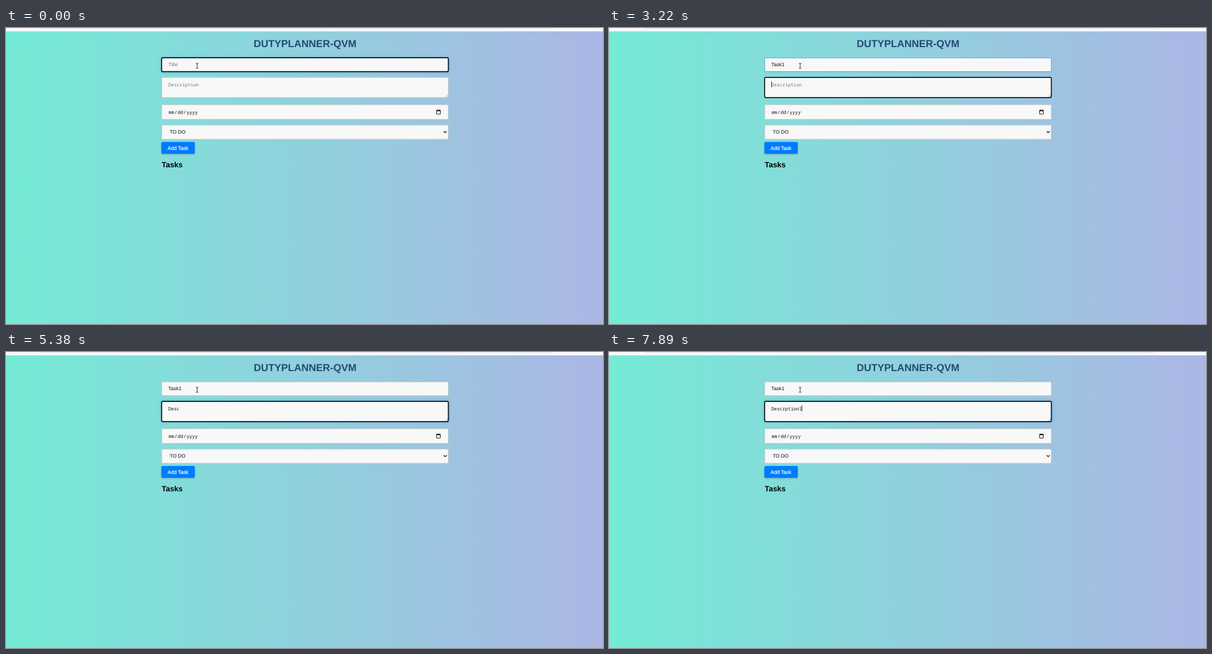
Animation, 1063 px wide and 527 px high, one loop 8 s. Source, as an HTML page:

```html
<!DOCTYPE html>
<html lang="en">
<head>
<meta charset="utf-8">
<title>Task form</title>
<style>
  html, body { margin: 0; width: 100%; height: 100%; overflow: hidden; }
  svg {
    display: block; width: 1063px; height: 527px;
    background: linear-gradient(90deg, #74ebd5, #acb6e5);
    font: 9px "Liberation Sans", Arial, sans-serif;
    text-rendering: geometricPrecision;
  }
  text { fill: #111; white-space: pre; }
  .mono { font: 8.25px "Noto Sans Mono", monospace; }
  .bold { font-weight: 700; }
  .hint { fill: #757575; }
  .box { fill: #f8f8f8; stroke: #c9cbcb; stroke-width: 1.1; }
  .ring { fill: none; stroke: #101010; stroke-width: 1.7; visibility: hidden; }
  .focus .ring { visibility: visible; }
  .focus .box, .fading .box { stroke: #5ba6ec; }
  .glow .box { filter: drop-shadow(0 .8px 2px rgba(0, 90, 190, .55)); }
  .button { fill: #007bff; filter: drop-shadow(0 1.2px 1.6px rgba(0, 40, 90, .3)); }
  .line { fill: none; stroke: #111; }
</style>
</head>
<body>
<svg viewBox="0 0 1063 527">
  <rect width="1063" height="6" fill="#f8f9fa"/>
  <rect x="64" width="907" height="1.4" fill="#e3e6f6"/>

  <text class="bold" x="532.5" y="34.3" font-size="18" text-anchor="middle" style="fill:#264a73">DUTYPLANNER-QVM</text>

  <g id="title">
    <rect class="box" x="277.3" y="53.2" width="510.2" height="24.4" rx="1.8"/>
    <rect class="ring" x="277.2" y="52.9" width="510.4" height="24.8" rx="2"/>
    <text class="hint" x="289" y="68.2">Title</text>
    <text class="value" x="289" y="68.2"></text>
    <rect class="caret" y="61" width="1" height="9.5" fill="#222"/>
  </g>

  <g id="desc">
    <rect class="box" x="277.3" y="88" width="510.2" height="35.8" rx="1.8"/>
    <path class="line" d="M782 123 L787 118 M785 123 L787 121" stroke-width=".6" style="stroke:#777"/>
    <rect class="ring" x="277.2" y="87.8" width="510.4" height="36" rx="2"/>
    <text class="mono hint" x="289" y="103.8">Description</text>
    <text class="mono value" x="289" y="103.8"></text>
    <rect class="caret" y="95" width="1" height="10.5" fill="#222"/>
  </g>

  <rect class="box" x="277.3" y="136.6" width="510.2" height="26" rx="1.8"/>
  <text class="mono" y="152.7"><tspan x="289.5">mm</tspan><tspan dx=".6">/</tspan><tspan dx=".6">dd</tspan><tspan dx=".6">/</tspan><tspan dx=".6">yyyy</tspan></text>
  <path class="line" d="M766.7 146.7 H773.4 V153.2 H766.7 Z M768.3 145 V147 M771.8 145 V147"/>
  <path class="line" d="M766.4 147.3 H773.7" stroke-width="1.6"/>

  <rect class="box" x="277.3" y="172.9" width="510.2" height="25.2" rx="1.8"/>
  <text x="291.4" y="188.2">TO DO</text>
  <path class="line" d="M779.3 183.7 L782 186.4 L784.7 183.7" stroke-width="1.3"/>

  <rect class="button" x="276.7" y="203" width="59.4" height="21" rx="2.3"/>
  <text x="306.3" y="216.6" text-anchor="middle" style="fill:#fff;stroke:#fff;stroke-width:.25px">Add Task</text>

  <text class="bold" x="277.3" y="248.2" font-size="13.5" style="fill:#000">Tasks</text>

  <path class="line" d="M338 62.7 Q340.3 62.7 340.3 64 V70.6 Q340.3 71.9 338 71.9 M342.6 62.7 Q340.3 62.7 340.3 64 M340.3 70.6 Q340.3 71.9 342.6 71.9" stroke-width=".9"/>
</svg>
<script>
  const LOOP = 8000, LEFT = 289, SWITCH = 3220, SETTLED = 3350;

  // [start in ms, typed text, caret visible]
  const titleSteps = [
    [0, "", false], [130, "", true], [570, "", false], [1130, "", true],
    [1550, "T", true], [2090, "Ta", true], [2230, "Tas", true],
    [2360, "Task", true], [2650, "Task1", true], [SWITCH, "Task1", false]
  ];
  const descSteps = [
    [0, "", false], [SWITCH, "", true], [3770, "", false],
    [3910, "D", true], [4200, "De", true], [4350, "Des", true],
    [4730, "Desc", true], [5380, "Desc", false], [5650, "Descr", true],
    [5800, "Descro", true], [6230, "Descr", true], [6370, "Descr", false],
    [6930, "Descrp", true], [7070, "Descrpt", true], [7200, "Descrpti", true],
    [7340, "Descrptio", true], [7500, "Descrption", true], [7890, "Descrption1", true]
  ];

  function makeField(id, steps) {
    const group = document.getElementById(id);
    const [hint, value, caret] = [".hint", ".value", ".caret"].map(s => group.querySelector(s));
    let shown;
    return (time, state) => {
      group.setAttribute("class", state);
      const step = steps.findLast(s => s[0] <= time);
      if (step === shown) return;
      shown = step;
      const [, text, caretOn] = step;
      value.textContent = text;
      hint.style.visibility = text ? "hidden" : "visible";
      const width = text ? value.getComputedTextLength() : 0;
      caret.setAttribute("x", Math.floor(LEFT + width));
      caret.style.visibility = caretOn ? "visible" : "hidden";
    };
  }

  const drawTitle = makeField("title", titleSteps);
  const drawDesc = makeField("desc", descSteps);

  function draw() {
    const time = performance.now() % LOOP;
    drawTitle(time, time < SWITCH ? "focus glow" : time < SETTLED ? "fading" : "");
    drawDesc(time, time < SWITCH ? "" : time < SETTLED ? "focus" : "focus glow");
    requestAnimationFrame(draw);
  }
  draw();
</script>
</body>
</html>
```
